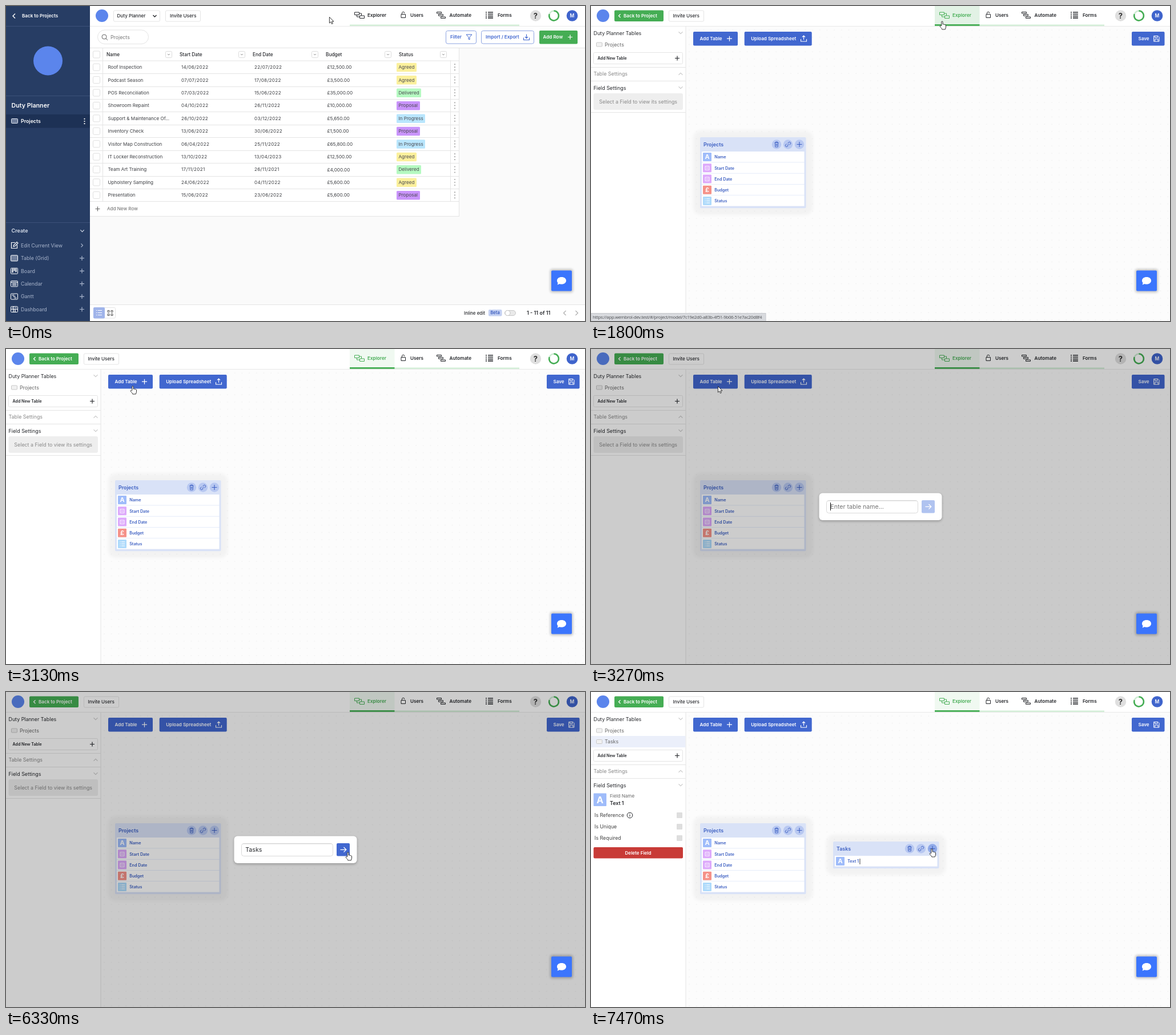
Animation of 1014x552 px, one loop 8000 ms. Source, as an HTML page:

```html
<!DOCTYPE html>
<html lang="en">
<head>
<meta charset="utf-8">
<title>Adding a table</title>
<style>
html, body { margin: 0; width: 100%; height: 100%; overflow: hidden; background: #fafafa; }
svg { display: block; width: 100vw; height: 100vh; }
text { font-family: Inter, Arial, sans-serif; white-space: pre; }
.url { font-family: "Open Sans", "Noto Sans", sans-serif; letter-spacing: -.28px; }
.date { letter-spacing: .3px; }
</style>
</head>
<body>
<svg id="stage" viewBox="0 0 1014 552" preserveAspectRatio="none"></svg>
<script>
const LOOP = 8000;
const BLUE = '#4167cf', GREEN = '#45ad54', INK = '#26282c', EDGE = '#e4e4e4', LOGO = '#5b85ec';

// Drawing helpers; text is placed by its vertical centre
const rect = (x, y, w, h, fill, more = '') =>
  `<rect x="${x}" y="${y}" width="${w}" height="${h}" fill="${fill}" ${more}/>`;
const box = (x, y, w, h, stroke = EDGE, fill = '#fff', r = 2) =>
  rect(x + .5, y + .5, w - 1, h - 1, fill, `rx="${r}" stroke="${stroke}"`);
const circle = (x, y, r, fill, more = '') => `<circle cx="${x}" cy="${y}" r="${r}" fill="${fill}" ${more}/>`;
const text = (x, y, s, size = 8.1, fill = INK, weight = 400, more = '') =>
  `<text x="${x}" y="${y + size * .36}" font-size="${size}" fill="${fill}" font-weight="${weight}" ${more}>${s}</text>`;
const path = (d, stroke = INK, w = 1, more = '') =>
  `<path d="${d}" fill="none" stroke="${stroke}" stroke-width="${w}" ${more}/>`;
const plus = (x, y, c, r = 4, w = 1.2) => path(`M${x - r} ${y}h${2 * r}M${x} ${y - r}v${2 * r}`, c, w);
const chevron = (x, y, turn, c, r = 3, w = 1.1) =>
  path(`M${-r} ${-r / 2}l${r} ${r}l${r} ${-r}`, c, w, `transform="translate(${x} ${y}) rotate(${turn})"`);
const hline = (x, y, w, c = EDGE) => rect(x, y, w, 1, c);
const group = (id, body, more = '') => `<g id="${id}" ${more}>${body}</g>`;
const dots = (x, y, c, gap) => [-gap, 0, gap].map(d => circle(x, y + d, 1.1, c)).join('');
const tray = (x, y, c, up) => path(`M${x - 5} ${y + 1}v4h10v-4M${x} ${y + 2}v-7M${x - 2.5} ` +
  (up ? `${y - 2.5}l2.5-2.5l2.5 2.5` : `${y - .5}l2.5 2.5l2.5-2.5`), c, 1.1);

const DATA = `Roof Inspection|14/06/2022|22/07/2022|12,500|0
Podcast Season|07/07/2022|17/08/2022|3,500|0
POS Reconciliation|07/03/2022|15/06/2022|35,000|1
Showroom Repaint|04/10/2022|26/11/2022|10,000|2
Support &amp; Maintenance Of...|26/10/2022|03/12/2022|5,650|3
Inventory Check|13/06/2022|30/06/2022|1,500|2
Visitor Map Construction|06/04/2022|25/11/2022|65,800|3
IT Locker Reconstruction|13/10/2022|13/04/2023|12,500|0
Team Art Training|17/11/2021|26/11/2021|4,000|1
Upholstery Sampling|24/06/2022|04/11/2022|5,600|0
Presentation|15/06/2022|23/06/2022|5,600|2`.split('\n').map(r => r.split('|'));
const STATUS = [['Agreed', '#fbf09c', 35], ['Delivered', '#b5f9c1', 43], ['Proposal', '#c994fb', 41], ['In Progress', '#b9e6fd', 50]];

function sidebar() {
  const rule = y => hline(0, y, 147, '#3c5179');
  const icons = [
    'M16 -5H9.500V5H19.500V-1M13 2l.5-2.500L19 -6l2 2l-5.500 5.500Z',
    '', 'M11.500 -4V3M14.500 -4V0M17.500 -4V2', 'M8.500 -2.500H20.500M11 0h7.500M11 2.500h7.500',
    'M10.500 -2.500h4M12.500 0h4M14.500 2.500h4', 'M8.500 0H20.500M13 -5V5M16 0V5M10 -2.500h2M15 -2.500h4'];
  const labels = ['Edit Current View', 'Table (Grid)', 'Board', 'Calendar', 'Gantt', 'Dashboard'];
  const soft = '#a9b5cc';
  return rect(0, 0, 147, 552, '#273d64') + rule(35) + rule(157) + rule(379) +
    chevron(14, 17.5, 90, '#fff', 4, 1.4) + text(28, 17.5, 'Back to Projects', 8.1, '#fff', 600) +
    circle(73.5, 96, 25.5, LOGO) +
    text(9.5, 174, 'Duty Planner', 10.7, '#fff', 600) + rect(0, 190, 147, 23.5, '#1d3155') +
    box(9, 197, 12, 9, '#dfe5f0', '#71809d', 1) + text(26, 202, 'Projects', 8.8, '#fff', 600) + dots(137.5, 202, '#fff', 4.2) +
    text(9.5, 394, 'Create', 9, '#d9e0ec', 600) + chevron(133.5, 394, 0, '#d9e0ec', 3.2) +
    labels.map((s, i) => {
      const y = 419.5 + i * 22.4;
      return `<g transform="translate(0 ${y})">` +
        (i ? rect(8.5, -5, 12, 10, i == 1 ? '#71809d' : 'none', 'stroke="#fff" rx="1"') : '') +
        path(icons[i], '#fff', i == 2 ? 2 : 1.2) + '</g>' + text(26, y, s, 8.9, soft) +
        (i ? plus(133, y, soft) : chevron(133, y, -90, soft));
    }).join('');
}

function grid() {
  const cols = [['Name', 176, 285], ['Start Date', 304, 413], ['End Date', 432, 541], ['Budget', 560, 669], ['Status', 688, 766]];
  const head = cols.map(([s, x, c]) => text(x, 85, s, 8.3, INK, 500) +
    box(c - 6, 79, 12, 12, '#dcdcdc') + chevron(c, 85, 0, '#777', 1.8, .9)).join('');
  const rows = DATA.map(([name, from, to, cost, k], i) => {
    const y = 107.2 + i * 22.42, [label, tint, w] = STATUS[k];
    return box(152, y - 6.5, 13, 13, '#dedede') + text(178.5, y, name, 8.1, '#3c3e42') +
      text(307, y, from, 8.1, '#3c3e42', 400, 'class="date"') + text(435, y, to, 8.1, '#3c3e42', 400, 'class="date"') +
      text(562.5, y, `£${cost}.00`, 8.2, '#3c3e42') +
      rect(684, y - 7.5, w, 15.5, tint, 'rx="1.500"') + text(687.5, y, label, 8.1, '#4a4a50') +
      dots(786, y, '#aaa', 5) + hline(147, Math.round(y + 11), 647);
  }).join('');
  return rect(147, 73, 647, 296, '#fff') + hline(147, 73, 867) + hline(147, 95.5, 647) + head + rows +
    rect(169, 73, 1, 269.5, EDGE) + rect(778, 95, 1, 247, EDGE) + rect(793, 73, 1, 296, EDGE) + hline(147, 368, 647) +
    box(152, 78.5, 13, 13, '#dedede') + plus(160.5, 355.5, '#666') + text(177, 355.5, 'Add New Row', 8.1, '#666');
}

function home() {
  const outline = (x, w) => box(x, 43, w, 23.5, '#8da4e2', '#fff', 3);
  const footer = rect(147, 523.5, 867, 29, '#fff') + hline(147, 523, 867) +
    box(153, 528, 39, 19.5, EDGE) + rect(153, 528, 20, 19.5, '#a0b4ea', 'rx="2"') +
    path('M158 533.500h1.500M161 533.500h7M158 537.500h1.500M161 537.500h7M158 541.500h1.500M161 541.500h7', '#fff', 1.2) +
    path('M178 533.500h3v3h-3zM184 533.500h3v3h-3zM178 539.500h3v3h-3zM184 539.500h3v3h-3z', '#555') +
    text(802, 538, 'Inline edit', 8, INK, 500) + rect(845, 532, 23.5, 11.5, '#c3d0f2', 'rx="2"') +
    text(848.5, 537.8, 'Beta', 7.4, '#3a5bbd', 600) + box(873, 533, 20, 10, '#c8c8c8', '#e9e9e9', 4.5) +
    circle(878.5, 538, 4.5, '#fff', 'stroke="#c4c4c4"') + text(912, 538, '1 - 11 of 11', 9, INK, 600) +
    chevron(978.5, 538, 90, '#aaa', 4) + chevron(999.5, 538, -90, '#aaa', 4);
  return rect(147, 36, 867, 37, '#fff') + grid() + footer + sidebar() +
    circle(168, 17, 11, LOGO) + box(188, 7.5, 82, 20) + text(194.5, 17.5, 'Duty Planner', 8.1, INK, 500) +
    chevron(260.5, 17.5, 0, INK, 3, 1.4) + box(279, 7.5, 62, 20) + text(287, 17.5, 'Invite Users', 8.2, INK, 500) +
    box(160, 41.500, 90, 25.500, EDGE, '#fff', 12.5) + circle(172, 54, 4, 'none', 'stroke="#666"') + path('M175 57l3 3', '#666') +
    text(183, 54.5, 'Projects', 8.8, '#777') +
    outline(770, 54) + text(778, 54.5, 'Filter', 8.1, BLUE, 600) + path('M806 50h10l-4 4.500v4.500l-2-1v-3.500z', BLUE) +
    outline(832, 93) + text(840, 54.5, 'Import / Export', 8.1, BLUE, 600) + tray(911.5, 54.5, BLUE) +
    rect(934, 43, 67, 23.5, GREEN, 'rx="2"') + text(940.5, 54.5, 'Add Row', 8.1, '#fff', 600) + plus(988, 54.5, '#fff');
}

function nav() {
  const item = (x, s) => text(x, 16.3, s, 8.2, INK, 600);
  const explorer = path('M610.500 11h8v4.500h-8zM619.500 17h8v4.500h-8zM614.500 15.500v3.500h5M618.500 13h4v4', 'currentColor') +
    text(633, 16.3, 'Explorer', 8.2, 'currentColor', 600);
  return rect(602, 32.5, 297, 2.5, '#d4efd8') + rect(602, 0, 78.5, 34.5, 'none', 'id="tab"') +
    group('underline', rect(602, 32, 78.5, 2.8, GREEN)) + group('explorer', explorer) +
    path('M692 14.500h7.500v6H692zM693.500 14.500v-2a2.200 2.200 0 0 1 4.400 0') + item(708, 'Users') +
    path('M754.500 10.500h8v2.500h-8zM757.500 14.700h8v2.500h-8zM761.500 19h8v2.500h-8z') + item(776.5, 'Automate') +
    path('M840 11h2M844 11h9M840 14.300h2M844 14.300h9M840 17.600h2M844 17.600h9M840 20.900h2M844 20.900h9', INK, 1.6) + item(861, 'Forms') +
    circle(927.5, 17, 9.7, '#dfdfdf') + text(927.5, 17.2, '?', 13, '#333', 700, 'text-anchor="middle"') +
    circle(959.5, 17, 8.4, 'none', 'stroke="#cdebd2" stroke-width="2.500"') +
    path('M959.500 8.600a8.400 8.400 0 1 1 -7.900 5.600', GREEN, 2.5) +
    circle(991.5, 17, 9.8, '#3f64cc') + text(991.5, 17.2, 'M', 8.5, '#fff', 600, 'text-anchor="middle"');
}

const TILES = { A: '#9fbcfa', date: '#dda9fb', '£': '#f59188', list: '#aedafb' };
function tile(x, y, kind, size = 15) {
  const c = size / 2;
  const mark = kind == 'date' ? path('M4 4.500h7v6.500H4zM6.300 6.500v2.500M8.700 6.500v2.500', '#fff', .9)
    : kind == 'list' ? path('M3.500 4h1.300M6 4h6M3.500 7.500h1.300M6 7.500h6M3.500 11h1.300M6 11h6', '#fff', 1.2)
    : text(c, c, kind, size * .72, '#fff', 700, 'text-anchor="middle"');
  return `<g transform="translate(${x} ${y})">${rect(0, 0, size, size, TILES[kind], 'rx="1"')}${mark}</g>`;
}

const fieldRow = ([name, kind], i) => {
  const y = 25 + i * 19.25;
  return rect(3, y, 179.5, 18.6, '#fff') + tile(5, y + 2, kind) + text(25.2, y + 9.7, name, 7.2, '#3c5fc2', 600);
};
function card(x, y, name, rows, plusId) {
  const h = rows ? 28 + rows * 19.25 : 28;
  const disc = cx => circle(cx, 12.5, 8.2, '#b8c8f1', cx == 174 ? `id="${plusId}"` : '');
  return `<g transform="translate(${x} ${y})">` +
    rect(-12, -12, 209.5, h + 24, '#000', 'rx="14" opacity=".035" filter="url(#soft)"') +
    rect(0, 0, 185.5, h, '#d9e2f7', 'rx="2"') + text(6, 12.5, name, 8.9, '#3c5fc2', 600) + disc(134) + disc(154) + disc(174) +
    path('M130.500 9.500h7M132.500 9.500v-1.500h3v1.500M131.300 9.500l.5 7.500h4.400l.5-7.500M133.200 11.500v3.500M134.800 11.500v3.500', '#3c5fc2', .9) +
    path('M152.500 14.500l3-3M153.500 10.500l1.500-1.500a2 2 0 0 1 3 3l-1.500 1.500M154.500 14.500l-1.500 1.500a2 2 0 0 1-3-3l1.500-1.500', '#3c5fc2', 1) +
    plus(174, 12.5, '#3c5fc2', 4.5, 1.1);
}

function model() {
  const entry = (y, s) => box(9, y - 4, 11, 8, '#c9c9c9', '#f1f1f1', 1) + text(24, y, s, 8.8, '#666');
  const check = (y, s) => text(6, y, s, 8.85, '#444') + rect(150, y - 5, 10, 10, '#dedede', 'rx="1"');
  const button = (x, w, s) => rect(x, 45, w, 24.5, BLUE, 'rx="2"') + text(x + 11.5, 57.3, s, 8.05, '#fff', 600);
  const fields = [['Name', 'A'], ['Start Date', 'date'], ['End Date', 'date'], ['Budget', '£'], ['Status', 'list']];
  const settings = tile(4.5, 177.500, 'A', 22.5) + text(33, 182.5, 'Field Name', 8.1, '#666') + text(33, 195, 'Text 1', 8.9, INK, 600) +
    check(216, 'Is Reference') + circle(68, 216, 4.8, 'none', `stroke="${INK}"`) + path('M68 215v3.500M68 213v1') +
    check(236, 'Is Unique') + check(256, 'Is Required') +
    rect(4.5, 272, 156.5, 19.5, '#c83b37', 'rx="2"') + text(82.5, 281.7, 'Delete Field', 8.1, '#fff', 600, 'text-anchor="middle"');
  const lower = box(4, 81, 157, 21, EDGE) + text(11.5, 91.7, 'Add New Table', 7.05, INK, 600) + plus(151, 91.5, INK) +
    hline(0, 107, 166) + text(4.5, 119, 'Table Settings', 8.9, '#888') + chevron(157, 119, 180, '#ccc', 3.5) +
    hline(0, 131, 166) + text(4.5, 143.5, 'Field Settings', 8.9) + chevron(157, 143, 0, '#ccc', 3.5) +
    group('hint', rect(4.5, 153, 156.5, 29, '#eee', 'rx="3"') + text(82.7, 167.8, 'Select a Field to view its settings', 8.9, '#888', 400, 'text-anchor="middle"') +
      hline(0, 186, 166));
  return rect(166, 36, 848, 516, 'url(#dots)') + rect(0, 36, 166, 516, '#fff') + rect(165.5, 36, 1, 516, EDGE) +
    circle(21, 17, 11, LOGO) + rect(41, 7.5, 86, 19.5, GREEN, 'rx="2"') + chevron(50, 17.2, 90, '#fff', 3, 1.3) +
    text(57, 17.3, 'Back to Project', 8.1, '#fff', 600) + box(136, 7.5, 62, 20) + text(143.5, 17.5, 'Invite Users', 8.2, INK, 500) +
    text(4.5, 47.500, 'Duty Planner Tables', 8.85) + chevron(157, 47, 0, '#ccc', 3.5) + entry(67.5, 'Projects') +
    group('taskEntry', rect(0, 77, 165.5, 20, 'none', 'id="taskBack"') + entry(87, 'Tasks')) +
    group('lower', lower) + group('settings', settings) +
    button(179, 78, 'Add Table') + plus(242.5, 57.2, '#fff', 4.5) +
    button(268.7, 118, 'Upload Spreadsheet') + tray(372.5, 57, '#fff', true) +
    button(947, 57.5, 'Save') + path('M985.500 52.500h7.500l2 2v7.500h-9.500zM987.500 52.500v3h4.500v-3M987.500 62v-4h5.500v4', '#fff') +
    card(191, 230, 'Projects', 5, 'plusA') + fields.map(fieldRow).join('') + '</g>' +
    group('emptyCard', card(424, 262, 'Tasks', 0, 'plusB') + '</g>') +
    group('taskCard', card(424, 262, 'Tasks', 1, 'plusC') + fieldRow(['Text 1', 'A'], 0) + rect(46.5, 30, .9, 10, INK) + '</g>');
}

const chat = rect(953, 461, 40, 41, '#000', 'rx="4" opacity=".22" filter="url(#near)"') + rect(955, 463.5, 36, 36, '#3b75fd', 'rx="2"') +
  '<path d="M973 475c4.800 0 8 2.700 8 6.300s-3.200 6.300-8 6.300c-1.300 0-2.400-.2-3.400-.6l-4 1.500l1-3.300c-1-1-1.600-2.300-1.600-3.900c0-3.600 3.200-6.300 8-6.300z" fill="#fff"/>';
const modal = rect(399.5, 254, 215, 48, '#000', 'rx="6" opacity=".25" filter="url(#near)"') + rect(399.5, 252.5, 215, 47.5, '#fff', 'rx="6"') +
  box(412, 265, 161, 23, '#d9d9d9', '#fff', 4) + path('M415 266h155', '#cfcfcf', .8) + text(419.3, 276.2, '', 10.6, INK, 400, 'id="input"') +
  rect(419, 269, 1, 14, '#111', 'id="caret"') + rect(579, 265, 23, 22.5, BLUE, 'rx="2" id="go"') +
  path('M585.500 276.300h10M591.500 272l4.300 4.300l-4.300 4.300', '#fff', 1.3);
const status = rect(0, 538.5, 306, 14, '#d8dade', 'stroke="#c6c8cc"') +
  text(3, 545.5, 'https://app.wembrol-dev.test/#/project/model/7c19e2d0-a83b-4f51-9b06-51e7ac20d8f4', 7.8, '#4a4c50', 400, 'class="url"');
const pointer = 'fill="#fff" stroke="#222" stroke-width=".9" stroke-linejoin="round"';
const cursor = group('arrow', `<path d="M.4 .4V11L2.900 8.700L4.500 12.500L6.300 11.700L4.700 8.100H8z" ${pointer}/>`) +
  group('hand', `<path d="M-1.200 7.500V1a1.150 1.150 0 0 1 2.300 0V5.200c.6-.7 1.800-.5 2 .4c.7-.6 1.700-.3 1.900.5c.7-.4 1.500 0 1.500.9V10c0 1.500-1 2.500-1.200 4H-.2c-.4-1.800-2.300-3.300-3.500-5c-.6-1 .6-2 1.400-1.300z" ${pointer}/>`);

document.getElementById('stage').innerHTML = `<defs>
  <pattern id="dots" x="166" y="36" width="12.700" height="12.700" patternUnits="userSpaceOnUse">
    ${rect(0, 0, 12.7, 12.7, '#fcfcfc')}${circle(6, 6, .7, '#e9e9e9')}</pattern>
  <filter id="soft"><feGaussianBlur stdDeviation="3"/></filter>
  <filter id="near"><feGaussianBlur stdDeviation="2"/></filter></defs>` +
  rect(0, 0, 1014, 552, '#fafafa') + rect(0, 0, 1014, 35, '#fff') + hline(0, 35, 1014, '#e9e9e9') +
  group('home', home()) + group('model', model()) + nav() +
  group('dim', rect(0, 0, 1014, 552, '#000', 'opacity=".2"')) + chat +
  group('modal', modal) + group('status', status) + group('cursor', cursor);

const $ = id => document.getElementById(id);
const show = (id, on) => $(id).style.display = on ? '' : 'none';

// Time and hotspot of each stop of the pointer
const STOPS = [[0, 566, 19], [70, 566, 18], [400, 566, 18], [1130, 615, 27], [1800, 615, 27], [2600, 236, 84],
  [2850, 217, 72], [3130, 222, 65], [5470, 222, 65], [6030, 599, 303], [6270, 599, 281], [7000, 599, 281],
  [7130, 595, 278], [7270, 597, 275], [LOOP, 597, 275]];
function pointerAt(t) {
  const i = STOPS.findIndex(s => s[0] > t), [t0, x0, y0] = STOPS[i - 1], [t1, x1, y1] = STOPS[i];
  const u = (t - t0) / (t1 - t0), k = u * u * (3 - 2 * u);
  return [x0 + (x1 - x0) * k, y0 + (y1 - y0) * k];
}

const KEYS = [4070, 4270, 4400, 4530, 4670];
const CARET = [419, 426, 431.5, 437, 442.5, 448];

function draw(t) {
  const [x, y] = pointerAt(t);
  const onModel = t >= 1200, asking = t >= 3270 && t < 6530, made = t >= 6530, edited = t >= 7470;
  const onTab = x >= 602 && x < 680 && y < 35;
  const onButton = onModel && y > 45 && y < 69.5 && (x > 179 && x < 257 || x > 269 && x < 387);
  const hand = asking ? t >= 6330 : made || onTab || onButton;

  show('home', !onModel);
  show('model', onModel);
  show('underline', onModel);
  show('status', onTab);
  $('tab').setAttribute('fill', onTab && t >= 1400 ? '#e2f2e5' : onModel || onTab ? '#f0f9f1' : 'none');
  $('explorer').style.color = onModel ? GREEN : INK;

  show('dim', asking);
  show('modal', asking);
  const typed = KEYS.filter(k => t >= k).length;
  $('input').textContent = typed ? 'Tasks'.slice(0, typed) : 'Enter table name...';
  $('input').setAttribute('fill', typed ? INK : '#757575');
  $('go').setAttribute('fill', typed ? BLUE : '#b0c3f0');
  $('caret').setAttribute('x', CARET[typed]);
  const since = t - (typed ? 4670 : 3270);
  show('caret', since < 0 || Math.floor(since / 530) % 2 == 0);

  show('taskEntry', made);
  show('emptyCard', made && !edited);
  show('taskCard', edited);
  show('hint', !edited);
  show('settings', edited);
  $('taskBack').setAttribute('fill', edited ? '#ebeffa' : 'none');
  $('lower').setAttribute('transform', `translate(0 ${made ? 20 : 0})`);
  for (const id of ['plusB', 'plusC']) $(id).setAttribute('fill', '#8fa9e8');

  show('hand', hand);
  show('arrow', !hand);
  $('cursor').setAttribute('transform', `translate(${x} ${y})`);
}

const start = performance.now();
(function tick() {
  draw((performance.now() - start) % LOOP);
  requestAnimationFrame(tick);
})();
</script>
</body>
</html>
```
